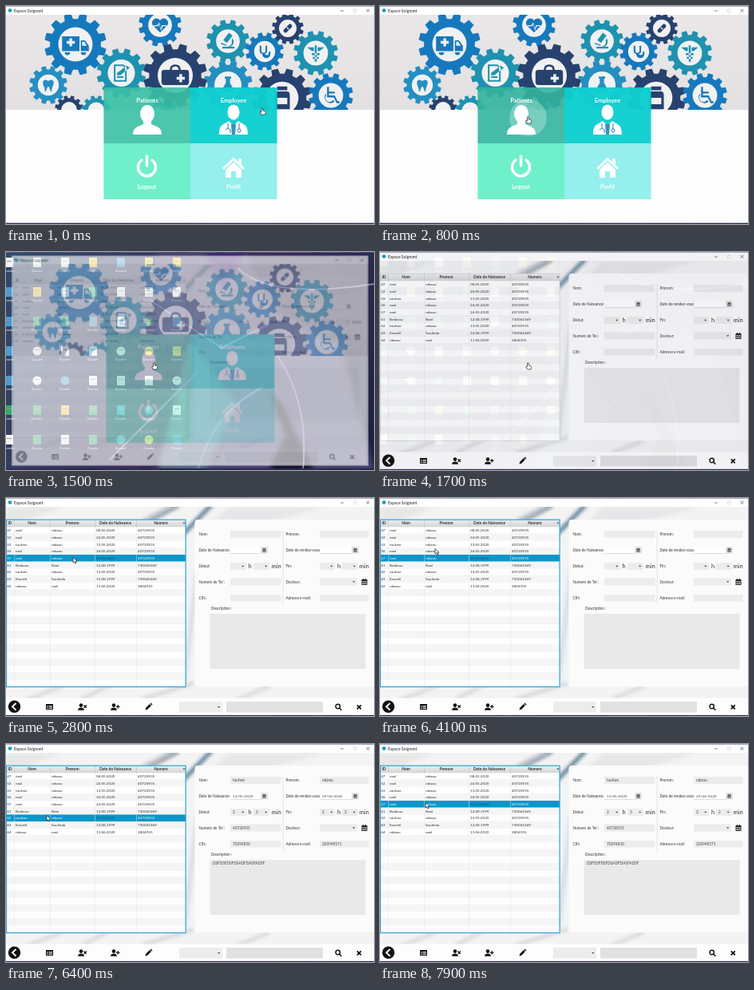
Recreate the animation shown at these times as an HTML page with a canvas. Size 461 by 273 pixels, loop 8000 ms.

```html
<!DOCTYPE html>
<html lang="fr">
<head>
<meta charset="utf-8">
<title>Espace Soignant</title>
<style>
html, body { margin: 0; width: 100%; height: 100%; overflow: hidden; background: #fff; }
canvas { display: block; width: 461px; height: 273px; }
</style>
</head>
<body>
<canvas id="stage"></canvas>
<script>
const W = 461, H = 273, LOOP = 8000, STEP = 100;
const WIN_TOP = 0.7, WIN_END = 271.7;
const dpr = window.devicePixelRatio || 1;
const FONT = 'Lato, "Open Sans", sans-serif';

function layer(canvas = document.createElement('canvas')) {
  canvas.width = W * dpr;
  canvas.height = H * dpr;
  const c = canvas.getContext('2d');
  c.scale(dpr, dpr);
  return c;
}

const stage = layer(document.getElementById('stage'));
let g = stage;

// ---- drawing helpers ----
function rect(x, y, w, h, color) {
  g.fillStyle = color;
  g.fillRect(x, y, w, h);
}
function box(x0, y0, x1, y1, color) { rect(x0, y0, x1 - x0, y1 - y0, color); }
function disc(x, y, r, color, ry = r) {
  g.fillStyle = color;
  g.beginPath();
  g.ellipse(x, y, r, ry, 0, 0, Math.PI * 2);
  g.fill();
}
function shape(d, x, y, color, scale = 1, rule = 'evenodd') {
  g.save();
  g.translate(x, y);
  g.scale(scale, scale);
  g.fillStyle = color;
  g.fill(new Path2D(d), rule);
  g.restore();
}
function line(d, color, width, x = 0, y = 0) {
  g.save();
  g.translate(x, y);
  g.strokeStyle = color;
  g.lineWidth = width;
  g.stroke(new Path2D(d));
  g.restore();
}
function text(s, x, y, size, color = '#333', align = 'left', weight = 400) {
  g.font = `${weight} ${size}px ${FONT}`;
  g.fillStyle = color;
  g.textAlign = align;
  g.textBaseline = 'middle';
  g.fillText(s, x, y);
}
function gradient(x0, y0, x1, y1, ...colors) {
  const grad = g.createLinearGradient(x0, y0, x1, y1);
  colors.forEach((c, i) => grad.addColorStop(i / (colors.length - 1), c));
  return grad;
}
function seeded(seed) {
  return () => (seed = (seed * 16807) % 2147483647) / 2147483647;
}

function titleBar() {
  box(0, WIN_TOP, W, 11, '#fff');
  disc(5, 5.6, 2.4, '#1b9fbd');
  text('Espace Soignant', 10, 6, 5.1, '#222');
  line('M419 6H423', '#555', 0.7);
  line('M435.500 4h3.500v3.500h-3.500z', '#ccc', 0.6);
  line('M451.500 3.800l3.800 3.800m0-3.800l-3.800 3.800', '#444', 0.7);
}

// ---- desktop behind the windows ----
function drawDesktop() {
  box(0, 0, W, H, gradient(0, 0, W, H, '#2f4a6c', '#3a2f58', '#1b2140'));
  g.save();
  g.filter = 'blur(3px)';
  shape('M190 0L300 0L330 70L420 120L461 273H210L250 150L150 90Z', 0, 0, '#4b4872');
  shape('M250 0H300L270 50Z', 0, 0, '#40206b');
  shape('M330 175L345 190L385 273H330L350 230Z', 0, 0, '#0f0e22');
  shape('M230 110L290 190L250 273H190Z', 0, 0, '#566f86');
  g.restore();
  line('M180 60L270 120L330 90M130 260L240 150M290 20Q330 60 461 40M340 130Q380 190 372 273M240 273Q260 200 320 170', '#8d80bb', 2);

  const rnd = seeded(41);
  const colors = ['#f4f4f4', '#f4f4f4', '#f4f4f4', '#f2c84b', '#39a96b', '#4b9bd0'];
  for (let col = 0; col < 7; col++) {
    for (let row = 0; row < 7; row++) {
      const x = 4 + col * 35, y = 13 + row * 37;
      const color = colors[Math.floor(rnd() * colors.length)];
      if (rnd() < 0.25) disc(x, y, 5.5, color);
      else box(x - 5, y - 6, x + 5, y + 6, color);
      box(x - 3, y - 2, x + 3, y - 1, '#8293a0');
      text('Dossier', x, y + 11, 4.2, '#fff', 'center');
    }
  }
  for (let x = 0; x < W; x += 12) {
    box(x, 0, x + 12, 1, rnd() < 0.5 ? '#5d5490' : '#38517d');
    box(x, 271, x + 12, H, rnd() < 0.5 ? '#35295d' : '#252a48');
  }
}

// ---- menu window ----
const ICON = {
  ambulance: 'M-10-6H3V5H-10ZM4-3H7L10 1V5H4ZM5-2V1H8.500L6.500-2ZM-8 6a2 2 0 1 0 4 0zM4 6a2 2 0 1 0 4 0zM-4.500-4.500h2v2h2v2h-2v2h-2v-2h-2v-2h2z',
  heart: 'M0 8L-8 0A4 4 0 0 1 0-5A4 4 0 0 1 8 0ZM-7 0H-3L-1-3L1 4L2 0H7V1H3L1 6L-1-1L-2 1H-7Z',
  note: 'M-7-8H2L5-5V8H-7ZM-5.500-6.500V6.500H3.500V-4.500L1.500-6.500ZM-4 3H2V4.500H-4ZM-4 0L5-7L8-5L-1 2H-4Z',
  bag: 'M-8-4H-4Q-4-8 0-8Q4-8 4-4H8Q10-4 10-2V5Q10 7 8 7H-8Q-10 7-10 5V-2Q-10-4-8-4ZM-2.500-4H2.500Q2.500-6.500 0-6.500Q-2.500-6.500-2.500-4ZM3-1H5V1H7V3H5V5H3V3H1V1H3Z',
  scope: 'M1-9L5-6L-1 2L-5-1ZM5-3A6 6 0 0 1 3 6H7V8H-6V6H0A5 5 0 0 0 4-1ZM-7 2L-1 4L-2 5L-8 3Z',
  steth: 'M-6-7H-4V-1A2 2 0 0 0 1-1V-7H3V-1A4 4 0 0 1 0 3A3 3 0 0 0 5 3V0H7V3A5 5 0 0 1-3 3A4 4 0 0 1-6-1Z',
  pill: 'M-6 2L2-6A3 3 0 0 1 6-2L-2 6A3 3 0 0 1-6 2ZM-2-1L1 2L2 1L-1-2Z',
  staff: 'M-1-8H1V9H-1ZM-9-6H-2L-2-2H-4ZM9-6H2L2-2H4ZM-4 0H4V2H-4ZM-3 4H3V6H-3Z',
  tooth: 'M-6-5C-3-8-1-5 0-5C1-5 3-8 6-5C8-1 4 2 4 8C2 9 2 2 0 2C-2 2-2 9-4 8C-4 2-8-1-6-5Z',
  flask: 'M-3-8H3V-6H2V-2L7 7H-7L-2-2V-6H-3Z',
  jar: 'M-4-9H4V-6H-4ZM-4-5H4Q6-5 6-2V9H-6V-2Q-6-5-4-5ZM-4 0V5H4V0Z',
  chair: 'M-4-9H-2V-4H4V-2H-2V0H4L7 6H9V8H6L3 2H-4ZM-5-2A5.500 5.500 0 1 0 4 6L2 5A3.700 3.700 0 1 1-5 0Z'
};
const BLUE = '#1679bd', TEAL = '#1e92b0', NAVY = '#27426f', SKY = '#258fc2';
const GEARS = [
  [79, 130, 18, NAVY, ''], [113, 131, 19, TEAL, ''], [203, 109, 25, TEAL, ''],
  [87, 48, 39, BLUE, 'ambulance'], [193, 24, 27, BLUE, 'heart'],
  [278, 99, 31, SKY, 'flask'], [144.5, 84, 31, TEAL, 'note'], [212, 87, 40, NAVY, 'bag'],
  [278, 44, 27, TEAL, 'scope'], [324, 57, 24, BLUE, 'steth'], [353, 28, 20, NAVY, 'pill'],
  [388, 59, 28, TEAL, 'staff'], [53, 99, 24, SKY, 'tooth'],
  [346, 115, 37, NAVY, 'jar'], [407, 112, 28, BLUE, 'chair']
];

function gear(x, y, r, color, icon) {
  const teeth = 12, pitch = Math.PI * 2 / teeth, root = r * 0.82;
  g.beginPath();
  for (let i = 0; i < teeth; i++) {
    const a = i + 0.5;
    for (const [da, rr] of [[-0.32, root], [-0.22, r], [0.22, r], [0.32, root]]) {
      g.lineTo(x + rr * Math.cos((a + da) * pitch), y + rr * Math.sin((a + da) * pitch));
    }
  }
  g.closePath();
  g.fillStyle = color;
  g.fill();
  disc(x, y, r * 0.55, '#f1f1f2');
  if (icon) shape(ICON[icon], x, y, color, r * 0.043);
}

function drawMenu(t) {
  box(0, WIN_TOP, W, WIN_END, '#fdfdfd');
  g.save();
  g.beginPath();
  g.rect(0, 11, W, 119);
  g.clip();
  box(0, 11, W, 130, gradient(0, 11, 0, 130, '#e9e7e7', '#e6e4e4', '#e2e0e0'));
  GEARS.forEach(a => gear(...a));
  g.restore();
  titleBar();

  const pressed = t >= 600;
  box(122.4, 102, 231, 172, pressed ? 'rgba(50,180,158,.9)' : 'rgba(58,192,166,.9)');
  box(231, 102, 339.6, 172, 'rgba(14,207,208,.96)');
  box(122.4, 172, 231, 242, '#70efcb');
  box(231, 172, 339.6, 242, '#94efed');
  ripple(t);
  menuContent();
}

function ripple(t) {
  if (t < 600 || t >= 1000) return;
  g.save();
  g.beginPath();
  g.rect(122, 102, 109, 70);
  g.clip();
  disc(185.5, 140, 8 + (t - 600) * 0.077, `rgba(255,255,255,${t < 900 ? 0.27 : 0.12})`);
  g.restore();
}

function menuContent() {
  const label = (s, x, y) => text(s, x, y, 7.5, '#fff', 'center', 700);
  label('Patients', 177, 119);
  label('Employee', 285, 119);
  label('Logout', 176.5, 227);
  label('Profil', 285, 227);

  disc(177, 135, 9, '#fff', 11);
  shape('M172 142H182V148C188 151 195 151 195 161H159C159 151 166 151 172 148Z', 0, 0, '#fff');

  disc(285, 133, 7.5, '#fff', 9.5);
  shape('M279 144L285 150L291 144C297 149 303 147 303 161H267C267 147 273 149 279 144Z', 0, 0, '#fff');
  shape('M282 148H288L287 161H283Z', 0, 0, '#3b8fc4');
  line('M278 147V153M292 147V154M275 155l3-2l3 2v4M290 156a2 2 0 1 0 4 0a2 2 0 1 0-4 0', '#257bb8', 1);

  g.lineCap = 'round';
  line('M170 193A11 11 0 1 0 183 193M176.500 188V200', '#fff', 3.4);
  g.lineCap = 'butt';
  shape('M271 203L285 189.500L291 195V191H295V199L299 203L297 205L285 193.500L273 205ZM275 205L285 195.500L295 205V215H288V207H282V215H275Z', 0, 0, '#fff', 1, 'nonzero');
}

// ---- records window ----
const ROWS = [
  ['47', 'nael', 'rabzou', '08.05.2020', '40720935'],
  ['52', 'nael', 'rabzou', '24.05.2020', '40720935'],
  ['53', 'toufare', 'rabzou', '13.05.2020', '40720935'],
  ['56', 'nael', 'rabzou', '24.05.2020', '40720935'],
  ['57', 'nael', 'rabzou', '24.05.2020', '40720935'],
  ['61', 'Brabzou', 'Nael', '12.08.1999', '730041869'],
  ['62', 'toufare', 'rabzou', '13.05.2020', '40720935'],
  ['63', 'Emartil', 'Soulinda', '12.08.1999', '730041869'],
  ['64', 'rabzou', 'nael', '11.06.2020', '2804935']
];
const COLS = [0, 10, 55, 111, 163, 225];
const ROW_H = 8.7, TOP = 36.2;

function drawTable(selected, focused) {
  box(0, 27, 225, 237, 'rgba(255,255,255,.94)');
  for (let i = 0; i < 23; i++) {
    const y = TOP + i * ROW_H, on = i === selected;
    const h = Math.min(ROW_H, 236.5 - y);
    rect(0, y, 225, h, on ? '#0b96c9' : i % 2 ? '#f5f5f6' : '#fefefe');
    if (!on) rect(0, y + h - 0.4, 225, 0.4, '#e9e9e9');
  }
  COLS.slice(1, 5).forEach(x => rect(x, TOP, 0.5, 200, '#e2e2e2'));
  ROWS.forEach((row, i) => row.forEach((s, k) => {
    const on = i === selected;
    const color = !on ? '#333' : k === 3 ? '#0a5173' : '#fff';
    text(s, COLS[k] + (k ? 2 : 1.2), TOP + (i + 0.5) * ROW_H + 0.2, 4.6, color);
  }));
  box(0, 27, 225, 36.2, gradient(0, 27, 0, 36, '#efefef', '#d6d6d6'));
  ['ID', 'Nom', 'Prenom', 'Date de Naissance', 'Numero'].forEach((s, k) => {
    text(s, (COLS[k] + COLS[k + 1]) / 2, 31.9, 4.9, '#333', 'center', 700);
    if (k) rect(COLS[k], 27, 0.5, 9.2, '#bbb');
  });
  shape('M221.500 30.500h3l-1.500 2z', 0, 0, '#444');
  g.strokeStyle = focused ? '#2aa5d8' : '#c8c8c8';
  g.lineWidth = focused ? 1.2 : 0.6;
  g.strokeRect(0.5, 27.2, 224.6, 209.3);
}

function calendar(x, y, w, color) {
  rect(x, y, w, w, color);
  rect(x + w * 0.2, y - 1, w * 0.15, 1.5, color);
  rect(x + w * 0.65, y - 1, w * 0.15, 1.5, color);
  for (let i = 0; i < 9; i++) {
    rect(x + w * (0.14 + 0.27 * (i % 3)), y + w * (0.3 + 0.22 * Math.floor(i / 3)), w * 0.18, w * 0.14, '#fff');
  }
}
function field(x0, y0, x1, y1, value = '') {
  box(x0, y0, x1, y1, '#ececed');
  text(value, x0 + 3, (y0 + y1) / 2 + 0.2, 4.7, '#444');
}
function combo(x0, x1, value, y0 = 81, y1 = 90) {
  field(x0, y0, x1, y1, value);
  shape('M0 0h3.400l-1.700 1.900z', x1 - 6, (y0 + y1) / 2 - 0.8, '#444');
}
function dateField(x0, x1, value = '') {
  box(x0, 61, x1, 69.5, '#fff');
  box(x0, 69, x1, 69.6, '#c9c9c9');
  text(value, x0 + 3, 65.4, 4.6, '#444');
  box(x1, 61, x1 + 9, 69.6, '#e3e3e3');
  calendar(x1 + 2.5, 63.6, 4, '#333');
}

const BLANK = {};
const FIRST = {
  name: 'nael', given: 'rabzou', birth: '24/05/2020', visit: '28/04/2020', from: ['1', '2'], to: ['2', '3'],
  tel: '40720935', cin: '61830274', mail: '203948571', note: 'DSFDSFDSFDSF'
};
const SECOND = {
  name: 'toufare', given: 'rabzou', birth: '13/05/2020', visit: '29/04/2020', from: ['2', '3'], to: ['2', '2'],
  tel: '40720935', cin: '70294830', mail: '203948571', note: 'DSFDSFDSFDSADFDASFADSF'
};

function drawForm(v) {
  g.fillStyle = 'rgba(252,252,253,.94)';
  g.beginPath();
  g.roundRect(236.5, 27, 226, 209, 4);
  g.fill();
  box(346.8, 41, 347.4, 133, '#d5d5d5');
  const left = ['Nom:', 'Date de Naissance:', 'Debut:', 'Numero de Tel :', 'CIN:'];
  const right = ['Prenom:', 'Date de rendez-vous:', 'Fin:', 'Docteur:', 'Adresse e-mail:'];
  left.forEach((s, i) => text(s, 241.5, 45.5 + i * 19.9, 4.7));
  right.forEach((s, i) => text(s, 350.5, 45.5 + i * 19.9, 4.7));
  const from = v.from || [], to = v.to || [];
  field(281, 41, 344.5, 50, v.name);
  field(393, 41, 454.5, 50, v.given);
  dateField(281, 319, v.birth);
  dateField(393, 433, v.visit);
  combo(281, 301, from[0]);
  combo(310, 330, from[1]);
  combo(393, 412, to[0]);
  combo(421, 440.5, to[1]);
  [[303.5, 'h'], [332.5, 'min'], [415, 'h'], [442.5, 'min']].forEach(([x, s]) => text(s, x, 85.5, 7.6));
  field(281, 100.5, 344.5, 109.5, v.tel);
  combo(393, 440, '', 100.5, 109.5);
  calendar(445.5, 102, 7, '#222');
  field(281, 121, 344.5, 129.5, v.cin);
  field(393, 121, 454.5, 129.5, v.mail);
  text('Description :', 257, 139, 4.7);
  box(255.5, 145, 450.5, 214, '#e9e9ea');
  text(v.note || '', 259, 150, 4.7, '#444');
}

function drawToolbar() {
  box(0, 250.5, W, WIN_END, '#fdfdfd');
  const ink = '#111';
  disc(10.5, 261.3, 7.7, ink);
  line('M12.500 257L8 261.300L12.500 265.600', '#fff', 2);
  rect(50, 258, 9, 7, ink);
  for (let i = 0; i < 3; i++) {
    rect(51, 260 + i * 1.6, 1.5, 0.8, '#fff');
    rect(53.5, 260 + i * 1.6, 4.5, 0.8, '#fff');
  }
  for (const [x, mark] of [[94, 'm0 0l3.400 3.400m0-3.400l-3.400 3.400'], [135, 'm1.700-.5v4.600m-2.300-2.300h4.600']]) {
    disc(x, 259.6, 2.3, ink);
    shape('M-4 4.500C-4 0 4 0 4 4.500Z', x, 261.3, ink);
    line('M3.500 0' + mark, ink, 1.3, x, 259.5);
  }
  shape('M174.500 265.500l.7-2.700l4.700-4.700l2 2l-4.700 4.700zM180.500 257.500l1-1l2 2l-1 1z', 0, 0, ink);
  combo(217, 271, '', 255, 268.5);
  box(276, 255, 397, 268.5, '#e1e1e2');
  line('M413 261a2.700 2.700 0 1 0 5.400 0a2.700 2.700 0 1 0-5.400 0M417.600 263l2.800 2.800', ink, 1.5);
  line('M439.800 259.300l5 5m0-5l-5 5', ink, 1.8);
}

function drawRecords(selected, focused, values) {
  box(0, WIN_TOP, W, WIN_END, '#f3f3f4');
  g.save();
  g.beginPath();
  g.rect(0, 11, W, 240);
  g.clip();
  g.filter = 'blur(2px)';
  shape('M0 11H70L20 30H0ZM280 11H400L330 30H260Z', 0, 0, '#e6e7e9');
  line('M172 30L215 8', '#c2c9cf', 8);
  line('M180 29L216 10', '#738490', 2.5);
  line('M222 45L258 8', '#5f8195', 5);
  line('M20 255L70 236M95 252L130 234M170 252L235 232M290 252L330 236', '#d3d4d7', 4);
  line('M223 230L240 90', '#dcdde0', 6);
  g.restore();
  titleBar();
  drawTable(selected, focused);
  drawForm(values);
  drawToolbar();
}

// ---- motion ----
const PATH = [
  [0, 321.5, 132], [100, 321.5, 132], [600, 186, 143], [1900, 186, 143], [2300, 86, 78],
  [3400, 86, 78], [3600, 77, 69], [3900, 77, 69], [4100, 71, 67], [5400, 71, 67],
  [5700, 53, 93], [6600, 53, 93], [7000, 57, 102], [7100, 57, 102], [7600, 59, 77], [LOOP, 59, 77]
];
const ease = p => p * p * (3 - 2 * p);

function cursorAt(t) {
  const i = PATH.findIndex(k => k[0] > t);
  const [t0, x0, y0] = PATH[i - 1], [t1, x1, y1] = PATH[i];
  const p = ease((t - t0) / (t1 - t0));
  return [x0 + (x1 - x0) * p, y0 + (y1 - y0) * p];
}

function drawCursor(t) {
  const [x, y] = cursorAt(t);
  const d = t < 2000
    ? 'M-1.500-4Q-.5-5 .3-4V-1L3-.4Q4 0 3.700 1.500L3 4H-1L-3.500 1Q-3-.3-1.500.8Z'
    : 'M-2-3.500V3L-.4 1.600L.8 4L2 3.400L.9 1.200H3Z';
  shape(d, x, y, '#fff');
  line(d, '#222', 0.7, x, y);
}

function selectedAt(t) {
  if (t < 2800) return -1;
  if (t < 4900) return 4;
  if (t < 6000) return 3;
  return t < 7700 ? 6 : 4;
}

const desktop = layer(), menu = layer(), records = layer();
function into(target, draw) {
  g = target;
  g.clearRect(0, 0, W, H);
  draw();
  g = stage;
}
into(desktop, drawDesktop);

function show(source, alpha = 1, scale = 1) {
  stage.save();
  stage.globalAlpha = alpha;
  stage.translate(W / 2, H / 2);
  stage.scale(scale, scale);
  stage.drawImage(source.canvas, -W / 2, -H / 2, W, H);
  stage.restore();
}

// Window swap: [menu alpha, menu scale, records alpha, records scale] per step
const SWAP = [
  [0.94, 0.995, 0, 0.92], [0.78, 0.985, 0.08, 0.93], [0.52, 0.97, 0.27, 0.96],
  [0.15, 0.95, 0.7, 0.985], [0, 0.94, 0.94, 1], [0, 0.94, 1, 1]
];

function render(t) {
  show(desktop);
  const step = Math.floor((t - 1300) / STEP);
  const [ma, ms, ra, rs] = step < 0 ? [1, 1, 0, 1] : SWAP[Math.min(step, SWAP.length - 1)];
  if (ma) {
    into(menu, () => drawMenu(t));
    show(menu, ma, ms);
  }
  if (ra) {
    const values = t < 5400 ? BLANK : t < 6300 ? FIRST : SECOND;
    into(records, () => drawRecords(selectedAt(t), t >= 2800, values));
    show(records, ra, rs);
  }
  drawCursor(t);
}

let last = -1;
function tick() {
  const t = Math.floor((performance.now() % LOOP) / STEP) * STEP;
  if (t !== last) render(last = t);
  requestAnimationFrame(tick);
}
tick();
</script>
</body>
</html>
```
